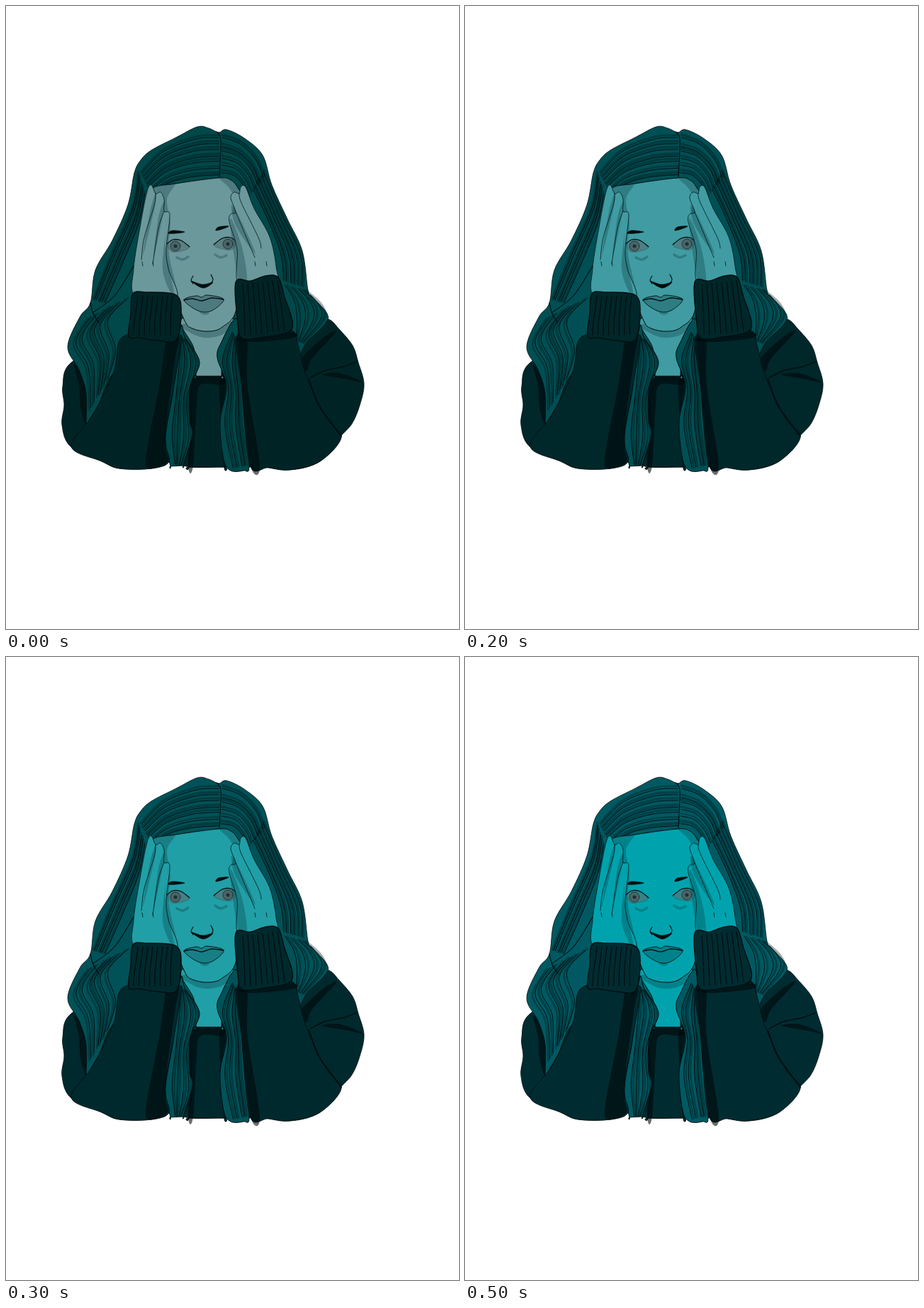
Write an HTML page with a canvas that moves like this. It is 639 px wide and 877 px high and loops after 600 ms.

```html
<!DOCTYPE html>
<html lang="en">
<head>
<meta charset="utf-8">
<title>Overwhelmed</title>
<style>
html, body { margin: 0; width: 100%; height: 100%; overflow: hidden; background: #fff; }
canvas { display: block; }
</style>
</head>
<body>
<canvas id="stage" width="639" height="877"></canvas>
<script>
const ctx = document.getElementById('stage').getContext('2d');
const STEP = 100, COUNT = 6;
const INK = '#000d0f', SOFT = 'rgba(0,22,26,.8)';
const shades = { skin: 'rgba(0,45,52,.28)', hair: 'rgba(0,18,22,.34)', knit: 'rgba(0,8,10,.58)' };

// Skin loses its grey over four steps; hair and knit brighten slightly.
function toneAt(step) {
  const t = Math.min(1, step / 4);
  return {
    skin: `rgb(${107 * (1 - t ** 1.3)}, ${152 + 2.2 * step}, ${155 + 3.6 * step})`,
    hair: `rgb(0, ${72 + 3.4 * step}, ${74 + 4.8 * step})`,
    knit: `rgb(0, ${36 + 1.6 * step}, ${38 + 2.2 * step})`
  };
}

const parse = text => text.trim().split(/\s+/).map(s => s.split(',').map(Number));

// Smooth curve through points; a doubled point makes a corner.
function curve(p, closed) {
  const n = p.length, path = new Path2D();
  const at = i => closed ? p[(i + n) % n] : p[Math.max(0, Math.min(n - 1, i))];
  path.moveTo(...p[0]);
  for (let i = 0; i < (closed ? n : n - 1); i++) {
    const [a, b, c, d] = [at(i - 1), at(i), at(i + 1), at(i + 2)];
    path.bezierCurveTo(b[0] + (c[0] - a[0]) / 6, b[1] + (c[1] - a[1]) / 6,
      c[0] - (d[0] - b[0]) / 6, c[1] - (d[1] - b[1]) / 6, c[0], c[1]);
  }
  return path;
}

const layers = [];
function shape(fill, pts, width = 1, stroke = INK) {
  layers.push({ path: curve(parse(pts), true), fill, stroke, width });
}
function shade(kind, pts) {
  layers.push({ path: curve(parse(pts), true), fill: shades[kind] });
}
function line(stroke, width, pts) {
  layers.push({ path: curve(typeof pts === 'string' ? parse(pts) : pts), stroke, width });
}
function disc(fill, x, y, r, stroke, width) {
  const path = new Path2D();
  path.arc(x, y, r, 0, 7);
  layers.push({ path, fill, stroke, width });
}

let seed = 7;
const rand = () => (seed = seed * 16807 % 2147483647) / 2147483647;

// Locks of hair: curves blended between two guides, each with a dark band beside it.
function strands(from, to, count) {
  const a = parse(from), b = parse(to);
  const blend = k => a.map(([x, y], i) => [x + (b[i][0] - x) * k, y + (b[i][1] - y) * k]);
  for (let i = 0; i < count; i++) {
    const k = (i + .3 + rand() * .4) / count;
    line(shades.hair, 2 + rand() * 2.5, blend(k + .4 / count));
    line(INK, 1, blend(k));
  }
}

// Shoulders and torso
shape('knit', `92,502 80,535 82,562 79,590 91,620 135,641 160,651 205,651 231,642 260,649 305,649
  343,649 350,646 400,653 443,641 470,608 488,588 499,562 505,532 497,502 489,478 470,455 455,441
  430,440 300,470 160,470`, .8);
shade('knit', '96,505 108,522 114,560 113,590 105,565 103,535');
shade('knit', '414,500 446,468 466,458 432,496 424,514');
shade('knit', '446,519 472,517 504,530 478,525');
line(INK, 1.4, '430,523 450,513 475,508 494,501');

// Long hair
shape('hair', `300,178 286,172 270,170 240,185 205,203 190,217 181,235 172,280 150,330 126,372
  119,418 104,438 87,480 103,512 113,545 113,590 113,590 130,562 160,510 250,490 330,490 400,455
  413,497 413,497 424,474 450,448 453,433 432,409 426,400 418,345 397,300 375,252 362,210 336,186
  311,174`, .8);
strands('301,240 262,243 230,251 208,266', '300,182 268,184 222,202 190,234', 7);
strands('304,239 320,242 332,254 340,270', '306,182 332,192 354,215 364,240', 6);
strands('197,268 188,310 166,365 142,418', '186,232 178,280 148,348 122,412', 5);
strands('178,408 148,440 158,482 146,520', '114,440 94,476 112,512 117,570', 6);
strands('347,262 368,305 384,350 388,385', '364,230 390,290 418,350 420,395', 6);
strands('390,392 402,414 406,440 408,470', '422,400 444,420 448,440 420,474', 4);
line(INK, 1.1, '180,366 153,408 122,432');
line(INK, 1.1, '119,418 123,433 131,446');
line(INK, 1.1, '297,177 303,187 302,222 301,241');

// Neck and shirt front
shape('knit', '258,520 258,520 315,520 315,520 308,580 308,649 308,649 258,649 258,649 262,600');
shade('knit', '262,520 262,520 314,520 314,520 306,533 275,533 269,560 264,647 257,647 258,560');
shade('knit', '301,530 312,530 306,565 307,647 304,600');
shape('skin', '248,440 320,440 306,470 304,521 304,521 268,521 268,521 265,482');
shade('skin', '249,448 320,445 306,462 282,467 262,461');

// Front locks
shape('hair', `247,450 253,468 273,501 260,535 259,583 263,603 250,647 250,647 232,648 232,648
  225,607 236,540 238,500`);
shape('hair', `325,440 304,473 298,495 311,535 302,585 307,638 317,654 335,654 343,648 336,580
  330,500`);
strands('246,468 240,505 237,550 230,600 237,645', '255,470 271,502 257,556 261,608 248,646', 4);
strands('318,458 302,497 311,538 305,590 317,651', '326,470 328,505 331,545 334,590 341,645', 4);

// Face
shape('skin', `206,258 240,250 300,242 317,245 327,256 338,280 329,340 325,426 305,452 285,458
  263,454 252,443 234,397 218,360 214,290`);
shade('skin', '205,260 238,250 227,272 232,306 230,350 248,428 230,390 215,295');
shade('skin', '301,242 317,245 330,258 336,282 318,316 320,266');

// Eyes: lid and white follow the iris, the outer corner lies on the given side.
function eye(x, y, side) {
  const px = d => x + d * side;
  shape('rgba(84,114,117,.65)', `${px(-11)},${y - 1} ${px(-4)},${y - 8} ${px(7)},${y - 8}
    ${px(19)},${y + 2} ${px(8)},${y + 7} ${px(-5)},${y + 8}`, .2);
  disc('#4a6467', x, y, 7, '#1b3235', .9);
  disc('#1b3235', x, y, 2.5);
  line(INK, 1.2, `${px(-12)},${y - 3} ${px(-4)},${y - 9} ${px(8)},${y - 8} ${px(20)},${y + 1}`);
  line(shades.skin, 3.5, `${px(2)},${y + 16} ${px(10)},${y + 19} ${px(18)},${y + 15}`);
}
eye(239, 338, 1);
eye(313, 335, -1);
shape(INK, '229,320 235,316 252,318 240,320', .7);
shape(INK, '296,316 300,311 314,310 305,314', .7);

// Nose and mouth
shape(INK, '261,387 277,392 292,389 278,397', .7);
line(INK, 1.1, '264,380 261,386 264,391');
line(INK, 1.1, '289,378 292,385 289,391');
shape(shades.skin, '251,414 268,408 276,410 284,407 307,413 290,429 271,429', .9);
line(INK, 1.4, '251,414 263,412 276,415 290,411 307,413');
shade('skin', '273,431 287,432 280,435');

// Hands
shape('skin', `183,408 180,370 190,306 199,261 205,252 211,264 218,262 223,272 223,289 231,294
  226,342 229,370 240,411`, 1, SOFT);
shape('skin', `329,392 326,342 315,304 317,293 324,290 317,270 322,262 329,264 331,255 338,255
  350,285 372,325 381,367 379,388`, 1, SOFT);
shade('skin', '211,264 210,282 193,351 203,290');
shade('skin', '223,275 222,291 208,355 215,298');
shade('skin', '229,295 225,341 238,409 221,371');
shade('skin', '318,280 329,297 352,349 324,309');
shade('skin', '316,300 333,340 340,388 328,387');
line(SOFT, 1, '211,264 209,281 195,326 191,357');
line(SOFT, 1, '223,289 215,313 207,363');
line(SOFT, 1, '329,264 332,277 356,326 360,341');
line(SOFT, 1, '324,290 332,309 351,354');
for (const x of [192, 207, 351, 367]) line(SOFT, 1, `${x},360 ${x + 1},366`);

// Sleeves
shape('knit', `162,468 152,515 123,575 92,620 135,641 160,651 205,651 230,641 224,607 236,540
  246,478 244,462 200,460`, .8);
shade('knit', '227,468 244,465 238,500 224,607 228,641 202,651 198,630 217,530');
shape('knit', `326,464 333,540 344,646 370,650 400,653 443,641 473,607 452,580 424,522 412,478
  403,458 360,462`, .8);
shade('knit', '326,466 340,468 341,535 358,648 344,645 333,540');
shade('knit', '328,468 400,459 406,467 350,473');
line(INK, 1.7, '427,525 440,560 453,579 473,606');

// Cuffs
shape('knit', '179,405 200,403 240,407 247,433 240,470 214,471 188,467 173,465 176,434', 1.4);
shape('knit', '324,389 345,387 366,380 384,382 393,410 404,444 398,459 364,466 333,468 327,445', 1.4);
for (let i = 0; i < 8; i++) {
  const a = 186 + i * 7, b = 334 + i * 7, lift = i * .8;
  line(INK, 1.2, `${a},408 ${a - 2},426 ${a - 5 + i * .3},445 ${a - 6 + i * .5},463`);
  line(INK, 1.2, `${b},${392 - lift} ${b + 2 + i * .4},${425 - lift} ${b + 3 + i},${463 - lift}`);
}

function paint(tone) {
  ctx.fillStyle = '#fff';
  ctx.fillRect(0, 0, 639, 877);
  ctx.lineCap = ctx.lineJoin = 'round';
  for (const { path, fill, stroke, width } of layers) {
    if (fill) {
      ctx.fillStyle = tone[fill] || fill;
      ctx.fill(path);
    }
    if (stroke) {
      ctx.strokeStyle = stroke;
      ctx.lineWidth = width;
      ctx.stroke(path);
    }
  }
}

const start = performance.now();
let shown = -1;
function tick() {
  const step = Math.floor((performance.now() - start) / STEP) % COUNT;
  if (step !== shown) paint(toneAt(shown = step));
  requestAnimationFrame(tick);
}
tick();
</script>
</body>
</html>
```
